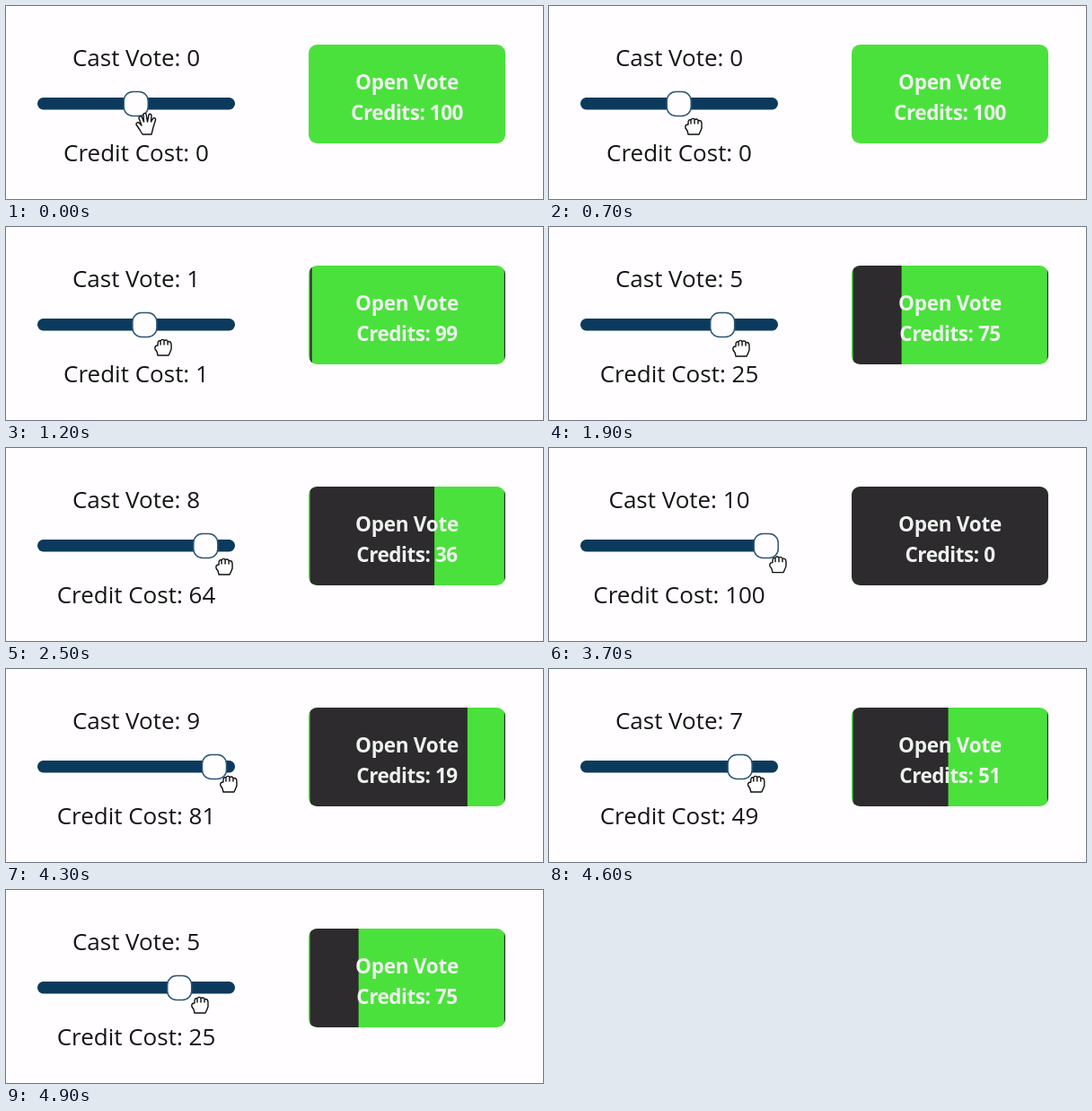
Recreate the animation shown at these times as an HTML page. Size 598 px wide and 215 px high, loop 5000 ms.

```html
<!DOCTYPE html>
<html lang="en">
<head>
<meta charset="utf-8">
<title>Vote slider</title>
<style>
  html, body { margin: 0; width: 100%; height: 100%; overflow: hidden; background: #fffdff; }
  svg { display: block; width: 598px; height: 215px; }
  text { font-family: "Open Sans", "Noto Sans", sans-serif; text-anchor: middle; white-space: pre; }
  .label { font-size: 26px; fill: #151515; }
  .button { font-size: 22.5px; font-weight: 700; fill: #eef1ee; }
  .hand { fill: #fff; stroke: #111; stroke-width: 1.4; stroke-linejoin: round; stroke-linecap: round; }
</style>
</head>
<body>
<svg viewBox="0 0 598 215">
  <clipPath id="buttonShape"><rect x="337" y="43" width="219" height="110" rx="9.5"/></clipPath>

  <text class="label" id="vote" x="145" y="67"></text>
  <text class="label" id="cost" x="145" y="173"></text>

  <rect x="35" y="102" width="220" height="13.5" rx="6.5" fill="#0c3a5c"/>
  <rect id="thumb" y="95.5" width="27" height="27" rx="10" fill="#fffdff" stroke="#2c557a" stroke-width="1.5"/>

  <g clip-path="url(#buttonShape)">
    <rect x="337" y="43" width="219" height="110" fill="#4be13c"/>
    <g fill="#2d2b2e">
      <rect id="spent" x="338.5" y="43" height="110"/>
      <rect id="leftEdge" x="337" y="43" width="2" height="110"/>
      <rect id="rightEdge" x="554.8" y="43" width="1.2" height="110"/>
    </g>
  </g>
  <text class="button" x="446.5" y="93" letter-spacing="-.25">Open Vote</text>
  <text class="button" id="credits" x="446.5" y="127" letter-spacing="-.45"></text>

  <g class="hand" id="hand">
    <path id="open" d="M-4 12L-7 7L-11 1Q-11 -2 -8 -1L-5 2L-8 -6Q-8 -9 -5 -8L-2.5 -2L-3 -10Q-2 -13 0 -10.5L1.5 -2L3 -10Q5 -12 6 -9L5.5 -2L8 -6Q11 -7 10.5 -4L8 4L6 12Z"/>
    <path id="closed" d="M-6 9L-7 5L-9 2Q-10 -2 -6 -2V-4Q-6 -8 -3 -7Q-1 -10 1 -7.5Q4 -9 5 -6.5Q9 -7 9 -3V2Q8 5 6 9ZM-3 -6V-3M1 -7V-3M5 -6V-3"/>
  </g>
</svg>
<script>
  const LOOP = 5000, GRAB_TIME = 300, FILL_LAG = 30;
  const STEP = 9.7, ZERO_X = 162.7, MAX_VOTE = 10;

  // Pointer path: time, x, y
  const path = [
    [0, 156, 131], [300, 156, 131], [500, 161, 134], [700, 161, 134],
    [1200, 175, 134], [1900, 214, 135], [2500, 243, 132], [2700, 255, 131],
    [4180, 255, 129], [4200, 253, 128], [4300, 248, 128], [4860, 216, 128], [5000, 216, 128]
  ];
  const $ = id => document.getElementById(id);
  const show = (id, visible) => $(id).setAttribute('visibility', visible ? 'visible' : 'hidden');

  function pointerAt(time) {
    const i = path.findIndex(point => point[0] > time);
    const [t0, x0, y0] = path[i - 1], [t1, x1, y1] = path[i];
    const k = (time - t0) / (t1 - t0);
    return [x0 + (x1 - x0) * k, y0 + (y1 - y0) * k];
  }

  function voteAt(time) {
    const [x] = pointerAt(Math.max(0, time));
    return Math.min(MAX_VOTE, Math.max(0, Math.round((x - ZERO_X) / STEP)));
  }

  function render(time) {
    const vote = voteAt(time), cost = vote * vote;
    $('vote').textContent = `Cast Vote: ${vote}`;
    $('cost').textContent = `Credit Cost: ${cost}`;
    $('credits').textContent = `Credits: ${100 - cost}`;
    $('thumb').setAttribute('x', 131.2 + vote * STEP);

    // The button fill follows the text slightly late.
    const share = voteAt(time - FILL_LAG) ** 2 / 100;
    $('spent').setAttribute('width', 216.5 * share);
    show('leftEdge', share === 1);
    show('rightEdge', share > 0);

    const grabbing = time >= GRAB_TIME;
    show('open', !grabbing);
    show('closed', grabbing);
    $('hand').setAttribute('transform', `translate(${pointerAt(time)})`);
  }

  const start = performance.now();
  function tick() {
    render((performance.now() - start) % LOOP);
    requestAnimationFrame(tick);
  }
  tick();
</script>
</body>
</html>
```
